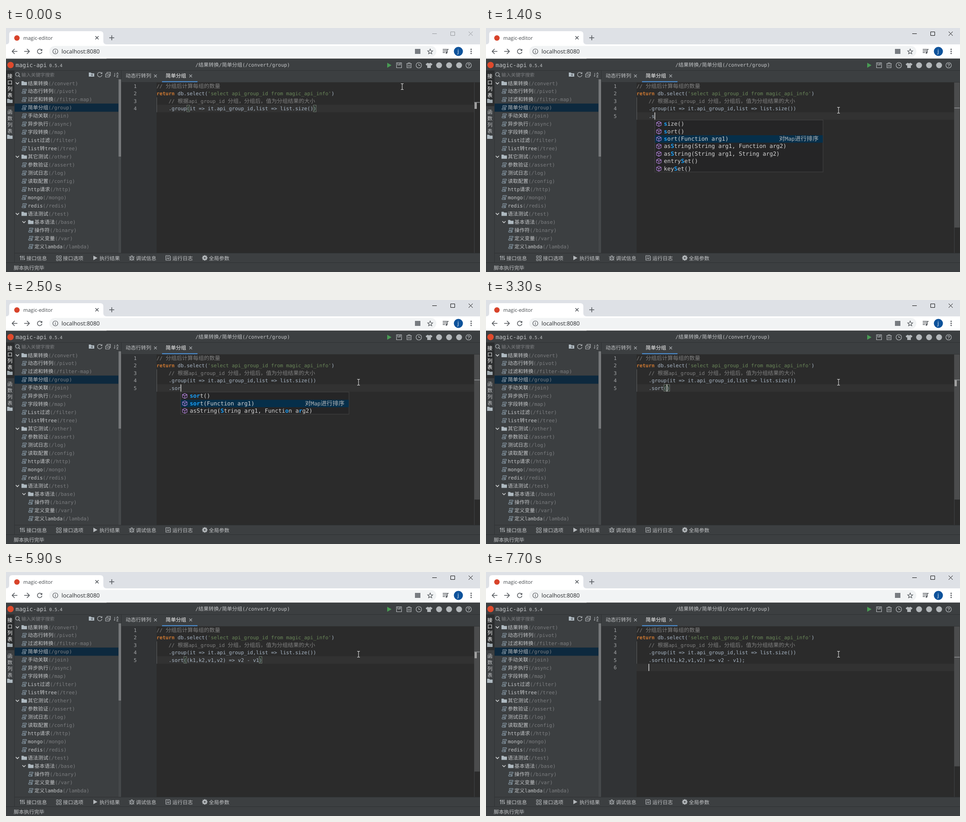
An HTML page that plays this animation: 1042x537 px, repeating every 8 s.

```html
<!DOCTYPE html>
<html lang="zh">
<head>
<meta charset="utf-8">
<title>magic-editor</title>
<style>
html, body { margin: 0; width: 100%; height: 100%; overflow: hidden; background: #2b2b2b; }
svg { display: block; width: 100vw; height: 100vh; }
text {
  font: 10.9px "DejaVu Sans Mono", "Noto Sans CJK SC", "Noto Sans CJK", monospace;
  fill: #c3c5c7; white-space: pre; text-rendering: geometricPrecision;
}
.c { font-size: 1.03em; }
.sans { font-family: "Open Sans", "Noto Sans", sans-serif; fill: #45494d; }
.dim { fill: #7c7e80; }
.hi { fill: #fff; }
.code { font-size: 11px; fill: #a9b7c6; }
.code .c { font-size: 12px; }
.key { fill: #cc7832; font-weight: bold; }
.str { fill: #6a8759; }
.rem { fill: #808080; }
.num { fill: #a4a6a8; text-anchor: middle; }
.item { font-size: 12.45px; fill: #d4d4d4; }
.item b, .match { fill: #18a0fb; font-weight: bold; }
.note { font-size: 11.8px; fill: #b4b6b8; text-anchor: end; }
.note .c { font-size: 13.1px; }
.tip { font-size: 12.2px; fill: #d4d4d4; }
.tip .c { font-size: 13.6px; }
.line { fill: none; stroke: #b4b8bb; stroke-width: 1.2; }
.ink { fill: none; stroke: #505459; stroke-width: 1.5; }
</style>
</head>
<body>
<svg viewBox="0 0 1042 537" preserveAspectRatio="none">
  <defs>
    <g id="folder"><path d="M-6-4.5h4.5l1.5 1.8H6V4.5H-6z" fill="#aeb9c0"/></g>
    <g id="script" fill="none" stroke="#93a7b5">
      <path d="M-3 1.5V-4.5H5V-2H3V4.5H-4.5Q-6 3-4.5 1.5H1.5V4M-1-2H1.5M-1 0H1.5"/>
    </g>
    <path id="down" d="M-3.5-1.8L0 1.8 3.5-1.8" fill="none" stroke="#d5d7d8" stroke-width="1.5"/>
    <path id="times" d="M-3-3L3 3M3-3L-3 3" fill="none" stroke="#a9adb0" stroke-width="1.1"/>
    <path id="turn" d="M4.3-2.6A5 5 0 1 0 5 .8M5-5V-2H2" fill="none"/>
    <path id="cube" d="M0-5.5L5-3V3L0 5.5-5 3V-3ZM-5-3L0-.5 5-3M0-.5V5.5" fill="none" stroke="#b180d7" stroke-width="1.1"/>
    <path id="beam" d="M-3-6.5H-1L0-5.5 1-6.5H3M0-5.5V5.5M-3 6.5H-1L0 5.5 1 6.5H3" fill="none" stroke="#e0e0e0" stroke-width="1.1"/>
  </defs>
  <g id="base"></g>
  <g id="live"></g>
</svg>
<script>
const CH = 6.622, ROW = 16.4, LEFT = 331, TOP = 119.8, VIEW = 375, LOOP = 8000;

const esc = s => s.replace(/&/g, '&amp;').replace(/</g, '&lt;');
const rich = s => esc(s).replace(/[\u3000-\u9fff\uff00-\uffef]+/g, '<tspan class="c">$&</tspan>');
const raw = (x, y, body, cls = '') => `<text x="${x}" y="${y + 4}" class="${cls}">${body}</text>`;
const text = (x, y, s, cls) => raw(x, y, rich(s), cls);
const rect = (x, y, w, h, fill, more = '') =>
  `<rect x="${x}" y="${y}" width="${w}" height="${h}" fill="${fill}" ${more}/>`;
const disc = (x, y, r, fill) => `<circle cx="${x}" cy="${y}" r="${r}" fill="${fill}"/>`;
const use = (id, x, y, more = '') => `<use href="#${id}" x="${x}" y="${y}" ${more}/>`;
const path = (x, y, d, cls = 'line', more = '') =>
  `<path transform="translate(${x} ${y})" d="${d}" class="${cls}" ${more}/>`;
const RING = 'M-5.5 0a5.5 5.5 0 1 0 11 0a5.5 5.5 0 1 0-11 0';
const SOLID = 'style="fill:#b4b8bb;stroke:none"';

function browser() {
  return rect(0, 0, 1042, 37, '#dee1e6') +
    '<path d="M0 36Q7 36 7 29V14Q7 7 14 7H207Q214 7 214 14V29Q214 36 221 36V68H0Z" fill="#fff"/>' +
    rect(0, 36, 1042, 31.5, '#fff') +
    rect(95, 39.5, 851, 24, '#f1f3f4', 'rx="12"') +
    disc(24, 22, 6, '#d8432a') +
    text(38, 21.5, 'magic-editor', 'sans" style="font-size:11px') +
    text(122, 51.5, 'localhost:8080', 'sans" style="font-size:12.45px;fill:#24272a') +
    path(200, 21.5, 'M-3.5-3.5L3.5 3.5M3.5-3.5L-3.5 3.5', 'ink') +
    path(232.5, 21.5, 'M-5.5 0H5.5M0-5.5V5.5', 'ink') +
    path(19, 51.5, 'M6 0H-5.5M0-5.5L-5.5 0 0 5.5', 'ink') +
    path(46, 51.5, 'M-6 0H5.5M0-5.5L5.5 0 0 5.5', 'ink') +
    use('turn', 74, 51.5, 'class="ink"') +
    path(108.5, 51.5, RING + 'M0-1V3.2M0-3.2V-2', 'ink', 'style="stroke-width:1.2"') +
    rect(899, 46, 12, 11, '#777b80') +
    path(932.5, 51.8, 'M0-5.5L1.6-1.8 5.6-1.5 2.5 1.2 3.5 5 0 2.9-3.5 5-2.5 1.2-5.6-1.5-1.6-1.8Z', 'ink', 'style="stroke-width:1.2"') +
    path(966, 51, 'M-6-4H3M-6-.5H3M-6 3H-1M4 3V-4H7', 'ink') + disc(968.3, 54.5, 2, '#505459') +
    disc(994.5, 51.5, 10, '#0d529b') +
    text(992.5, 51, 'j', 'sans" style="font-size:12px;fill:#fff') +
    [-4.5, 0, 4.5].map(d => disc(1022.5, 51.5 + d, 1.4, '#505459')).join('');
}

function header() {
  return rect(0, 67.5, 1042, 470, '#3c3f41') +
    disc(10, 81.5, 7, '#e04a2c') +
    text(21, 81.5, 'magic-api', '" style="font-size:12.7px') +
    text(95, 82, '0.5.4', '" style="font-size:9.7px') +
    text(416.5, 81, '/结果转换/简单分组(/convert/group)') +
    path(842.5, 82, 'M-4.5-5.5L5 0-4.5 5.5Z', '', 'fill="#499c54"') +
    path(864, 82, 'M-5.5-5.5H5.5V5.5H-5.5ZM-2.5-5V-.5H2.5V-5M1-4V-2') +
    path(886, 82, 'M-6-3.5H6M-2-3.5V-5.5H2V-3.5M-4.5-3V5.5H4.5V-3M-1.5-1V3.5M1.5-1V3.5') +
    path(907.5, 82, 'M-6 0a6 6 0 1 0 12 0a6 6 0 1 0-12 0M0-3.5V.5H3.5') +
    path(930, 82, 'M-3-5.5Q0-3 3-5.5L7.5-2.5 5.5 .8 4 0V6H-4V0L-5.5 .8-7.5-2.5Z', 'line', SOLID) +
    [952, 974, 996].map(x => disc(x, 82, 6.5, '#b4b8bb')).join('') +
    path(1017, 82, 'M-6 0a6 6 0 1 0 12 0a6 6 0 1 0-12 0M-2-1.5Q-2-3.2 0-3.2T2-1.5Q2-.3 0 .8V1.7M0 2.8V4');
}

const tree = [
  ['dir', 0, '结果转换', 'convert'], ['', 0, '动态行转列', 'pivot'], ['', 0, '过滤和转换', 'filter-map'],
  ['', 0, '简单分组', 'group'], ['', 0, '手动关联', 'join'], ['', 0, '异步执行', 'async'],
  ['', 0, '字段转换', 'map'], ['', 0, 'List过滤', 'filter'], ['', 0, 'list转tree', 'tree'],
  ['dir', 0, '其它测试', 'other'], ['', 0, '参数验证', 'assert'], ['', 0, '测试日志', 'log'],
  ['', 0, '读取配置', 'config'], ['', 0, 'http请求', 'http'], ['', 0, 'mongo', 'mongo'], ['', 0, 'redis', 'redis'],
  ['dir', 0, '语法测试', 'test'], ['dir', 1, '基本语法', 'base'], ['', 1, '操作符', 'binary'],
  ['', 1, '定义变量', 'var'], ['', 1, '定义lambda', 'lambda']
];

function sidebar() {
  let s = rect(0, 94, 18, 78, '#2b2d2e');
  [...'接口列表'].forEach((ch, i) => s += text(3, 106 + 14 * i, ch, 'hi'));
  [...'函数列表'].forEach((ch, i) => s += text(3, 184.5 + 14 * i, ch));
  s += use('folder', 8.5, 160.5, 'style="opacity:.9"') + use('folder', 8.5, 239.5);
  s += path(25.5, 102, 'M-4.5 0a4 4 0 1 0 8 0a4 4 0 1 0-8 0M2.5 3L5.5 6') +
    text(34, 103, '输入关键字搜索', 'dim" style="font-size:10.1px') +
    use('folder', 188, 102.5) + path(189, 103.5, 'M-2 0H2M0-2V2', '', 'stroke="#3c3f41"') +
    use('turn', 206, 102.5, 'class="line"') +
    path(224, 103, 'M-5-2H3V5H-5ZM-2-2V-5.5H5.5V2H3M-3 1.5H1') +
    path(242, 103, 'M-3-4V4L-5 2M1-1L3-5 5-1M1 1H4.5L1 5H5', 'line', 'style="stroke-width:1"');
  s += rect(19, 166.3, 228.5, 18, '#0d293e') + rect(247.5, 113, 5.5, 382, '#45484a') + rect(247.5, 113, 5.5, 170, '#77797b');
  tree.forEach(([kind, depth, name, route], i) => {
    const y = 121.5 + 17.97 * i, x = 14.5 * depth;
    s += kind ? use('down', x + 25, y) + use('folder', x + 40, y) : use('script', x + 40, y);
    s += raw(x + 48, y, `${rich(name)}<tspan class="dim">(/${route})</tspan>`);
  });
  return s;
}

function frame() {
  const edge = d => `<path d="${d}" stroke="#2f3133" fill="none"/>`;
  const gear = [0, 45, 90, 135].map(a => `<path d="M-6 0H6" stroke="#b4b8bb" stroke-width="2.6" transform="translate(437 506) rotate(${a})"/>`).join('');
  let s = rect(254, 119.5, 788, 375.5, '#2b2b2b') + rect(254, 119.5, 77, 375.5, '#313335') +
    text(263, 105, '动态行转列') + use('times', 328.5, 105.5) +
    text(351, 105, '简单分组', 'hi') + use('times', 406, 105.5) + rect(343, 117, 78, 2.3, '#4a88c7') +
    edge('M0 93.5H1042M18.5 94V516M253.5 94V495M18 495.5H1042M0 516.5H1042');
  ['接口信息', '接口选项', '执行结果', '调试信息', '运行日志', '全局参数']
    .forEach((name, i) => s += text(45 + 80.2 * i, 507, name));
  return s + text(17, 527.5, '脚本执行完毕') +
    path(36, 506, 'M-3.5 5V-4L-5.5-2M0-5V5M3.5-5V4L5.5 2M-2-2H2') +
    path(116, 506.5, 'M-5-5H-1V-1H-5ZM1.5-5H5.5V-1H1.5ZM-5 1.5H-1V5.5H-5ZM1.5 1.5H5.5V5.5H1.5Z', 'line', 'style="stroke-width:1"') +
    path(196, 506, 'M-4-5L5 0-4 5Z', 'line', SOLID) +
    path(276.5, 506, 'M-3-2H3V2Q3 5 0 5T-3 2ZM-2-2Q-2-5 0-5T2-2M-6-3L-3-1M6-3L3-1M-6 1H-3M6 1H3M-5 5L-3 3M5 5L3 3M0 0V3') +
    path(356.5, 506, 'M-5-5H3L5-3V5H-5ZM-3 2L-1 0 1 2 3-1M-2-3H1') +
    gear + disc(437, 506, 4.5, '#b4b8bb') + disc(437, 506, 1.8, '#3c3f41');
}

const code = [
  [['rem', '// 分组后计算每组的数量']],
  [['key', 'return'], ['', ' db.select('], ['str', "'select api_group_id from magic_api_info'"], ['', ')']],
  [['rem', '    // 根据api_group_id 分组，分组后，值为分组结果的大小']],
  [['', '    .group(it => it.api_group_id,list => list.size())']]
];

// Asterisks enclose the matched letters of a suggestion.
const sortFn = 'sort(Function arg1)';
const lists = {
  all: ['size()', 'sort()', sortFn, 'asString(String arg1, Function arg2)', 'asString(String arg1, String arg2)',
    'clear()', 'containsKey(Object arg1)', 'entrySet()', 'get(Object arg1)', 'isEmpty()', 'keySet()', 'values()'],
  s: ['*s*ize()', '*s*ort()', '*s*ort(Function arg1)', 'as*S*tring(String arg1, Function arg2)',
    'as*S*tring(String arg1, String arg2)', 'entry*S*et()', 'key*S*et()'],
  so: ['*so*rt()', '*so*rt(Function arg1)', 'as*S*tring(String arg1, Functi*o*n arg2)'],
  sor: ['*sor*t()', '*sor*t(Function arg1)', 'asString(*S*tring arg1, Functi*o*n a*r*g2)']
};

function popup(name, x) {
  const items = lists[name];
  let s = rect(x + .5, 202.5, 370, items.length * ROW - .5, '#252526', 'stroke="#454545"');
  items.forEach((item, i) => {
    const y = 211.2 + ROW * i;
    const chosen = item.replace(/\*/g, '') === sortFn;
    if (chosen) s += rect(x + 1, y - 8, 369, ROW, '#062f4a');
    const label = item.split('*').map((p, k) => k % 2 ? `<tspan class="match">${p}</tspan>` : p).join('');
    s += use('cube', x + 9.5, y) + raw(x + 20.5, y, label, 'item');
    if (chosen) s += text(x + 360.5, y, '对Map进行排序', 'note');
  });
  return s;
}

function hint(n) {
  const [top, width, title, notes] = n === 1
    ? [103.5, 353, sortFn, ['自定义排序规则，如(k1,k2,v1,v2) => v1 - v2', '对Map进行排序']]
    : [128.5, 131, 'sort()', ['对Map进行排序']];
  const mid = (top + 186.5) / 2;
  return rect(398.5, top, width, 186.5 - top, '#252526', 'stroke="#454545"') +
    `<path d="M424.5 ${top}V186.5M424.5 ${top + 25.5}H${398.5 + width}" stroke="#454545"/>` +
    use('down', 0, 0, `transform="translate(411 ${mid - 3}) scale(1.1 -1.1) translate(0 0)"`).replace(`${mid - 3})`, `${mid - 2.5})`) +
    raw(411, mid + 9.5, `${n}/2`, 'num" style="font-size:11.8px') + use('down', 411, mid + 22) +
    text(429, top + 12.5, title, 'tip') +
    notes.map((s, i) => text(429, top + 42.5 + 25 * i, s, 'tip')).join('');
}

// Each step changes only the listed properties and keeps the rest.
const pair = [[5, 9], [5, 10]], outer = [[5, 9], [5, 34]];
const call = '    .sort((k1,k2,v1,v2) => v2 - v1)';
const steps = [
  [0, { mouse: [871, 129], focus: false, on: false, n: 4, typed: '', col: 53, marks: [[4, 10], [4, 52]], list: '', tip: 0 }],
  [100, { mouse: [838, 147], focus: true, on: true }],
  [200, { mouse: [795, 170] }],
  [300, { mouse: [775, 181] }],
  [700, { n: 5, col: 4, marks: [] }],
  [1200, { typed: '    .', col: 5 }],
  [1300, { list: 'all' }],
  [1400, { typed: '    .s', col: 6, list: 's' }],
  [1500, { typed: '    .so', col: 7, list: 'so' }],
  [1600, { typed: '    .sor', col: 8, list: 'sor' }],
  [2100, { on: false }],
  [2500, { on: true }],
  [2800, { typed: '    .sort', col: 9, list: '' }],
  [3200, { typed: '    .sort()', col: 10 }],
  [3300, { marks: pair }],
  [3400, { tip: 1 }],
  [3700, { on: false }],
  [3900, { tip: 2 }],
  [4100, { on: true }],
  [4600, { tip: 0, on: false }],
  [5000, { typed: call, col: 34, on: true, marks: [] }],
  [5100, { marks: outer }],
  [5400, { col: 35 }],
  [5900, { on: false }],
  [6300, { typed: call + ';', col: 36, on: true, marks: [] }],
  [6600, { n: 6, col: 4 }],
  [7000, { on: false }],
  [7600, { on: true }]
];
const states = [];
steps.forEach(([, change], i) => states.push({ ...states[i - 1], ...change }));

function editor(s) {
  const rowTop = n => TOP + ROW * (n - 1), colX = c => LEFT + CH * c;
  const scale = VIEW / (VIEW + ROW * (s.n - 1));
  const mark = 120 + ROW * (s.n - 1) * scale;
  let out = rect(LEFT, rowTop(s.n), 698, ROW, '#323232');
  out += rect(LEFT, rowTop(3), 1, ROW * (Math.min(s.n, 5) - 2), '#5a5c5e');
  for (const [r, c] of s.marks)
    out += rect(colX(c) + .3, rowTop(r) + .8, CH - .4, ROW - 1.8, '#283328', 'stroke="#7d827e" stroke-width=".9"');
  [...code, [['', s.typed]]].forEach((parts, i) => {
    const body = parts.map(([cls, p]) => `<tspan class="${cls}">${rich(p)}</tspan>`).join('');
    out += raw(LEFT, rowTop(i + 1) + 8.2, body, 'code');
  });
  for (let i = 1; i <= s.n; i++) out += raw(284, rowTop(i) + 8.2, i, 'num');
  if (s.on) out += rect(colX(s.col) - .3, rowTop(s.n) + .3, 1.6, ROW - .6, '#d0d0d0');
  out += rect(1029, 120, 1, 375, '#414345');
  if (s.focus) out += rect(1029.5, 120, 12, VIEW * scale, '#4b4c4d');
  if (s.marks.length) out += rect(1030, mark, 5, ROW * scale, '#a0a0a0');
  out += rect(1029.5, mark - .6, 12, 1.6, '#8c8e90');
  if (s.list) out += popup(s.list, Math.round(colX(s.col)) - .5);
  if (s.tip) out += hint(s.tip);
  return out;
}

function draw(s) {
  const ink = s.focus ? '#111' : '#96999d';
  return `<path d="M937 12.5H947M977.5 8.5H986.5V16.5H977.5ZM1017 8L1026 17M1026 8L1017 17" fill="none" stroke="${ink}"/>` +
    editor(s) + use('beam', ...s.mouse);
}

const live = document.getElementById('live');
document.getElementById('base').innerHTML = browser() + header() + sidebar() + frame();
let shown = -1;
function tick() {
  const t = performance.now() % LOOP;
  const now = steps.findLastIndex(([at]) => at <= t);
  if (now !== shown) live.innerHTML = draw(states[shown = now]);
  requestAnimationFrame(tick);
}
tick();
</script>
</body>
</html>
```
